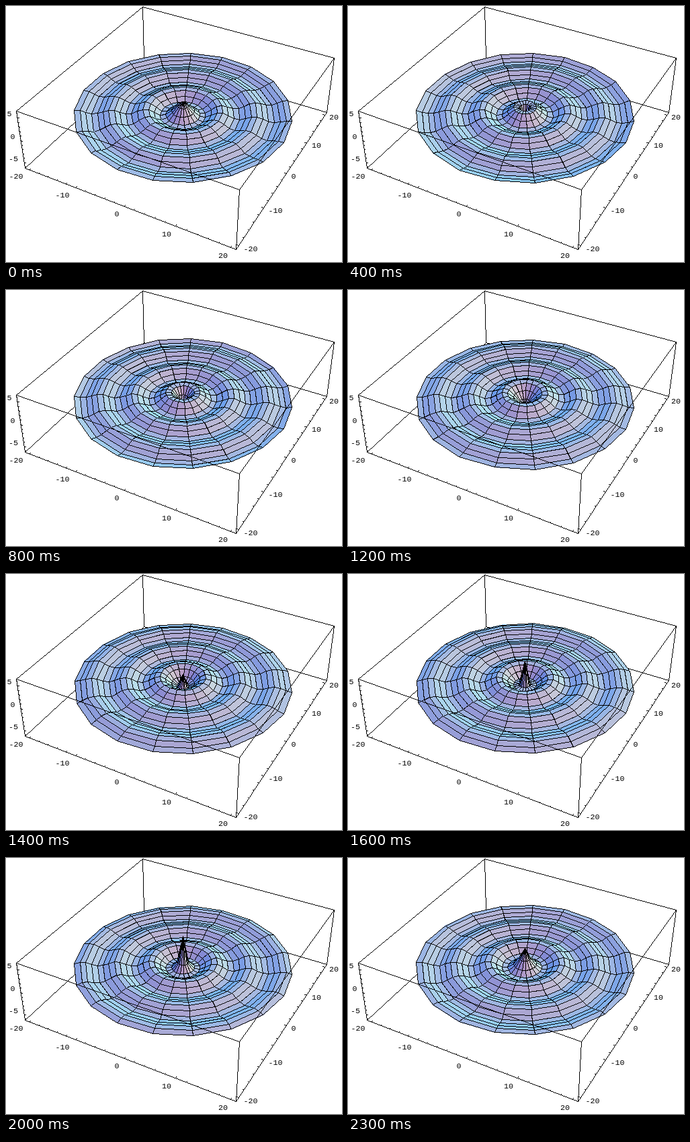
These frames come from a looping animation (500x381 px, 2.4 s). An HTML page with a canvas:

```html
<!DOCTYPE html>
<html lang="en">
<head>
<meta charset="utf-8">
<title>Outgoing cylindrical wave</title>
<style>
  html, body { margin: 0; width: 100%; height: 100%; overflow: hidden; background: #fff; }
  canvas, svg { position: absolute; left: 0; top: 0; display: block; }
  text { font: 11.67px "Liberation Mono", "Courier New", monospace; text-anchor: middle; }
</style>
</head>
<body>
<canvas id="plot" width="500" height="381"></canvas>
<svg id="labels" width="500" height="381"></svg>
<script>
const W = 500, H = 381;
const STEPS = 24, STEP_MS = 100;
const SPOKES = 19, RINGS = 19, R_MIN = 0.01, R_MAX = 20;
const XY = 21, Z = 6.36, AMP = 2;
const BLACK = 0xff000000;

const ctx = document.getElementById("plot").getContext("2d");
const image = ctx.createImageData(W, H);
const pixels = new Uint32Array(image.data.buffer);

// Camera: perspective view of the box centre, longest side scaled to 1.
const eye = [1.3, -2.4, 2];
const dist = Math.hypot(...eye);
const out = eye.map(v => v / dist);
const flat = Math.hypot(out[0], out[1]);
const right = [-out[1] / flat, out[0] / flat, 0];
const up = cross(out, right);

function cross(a, b) {
  return [a[1] * b[2] - a[2] * b[1], a[2] * b[0] - a[0] * b[2], a[0] * b[1] - a[1] * b[0]];
}
function dot(a, b) { return a[0] * b[0] + a[1] * b[1] + a[2] * b[2]; }
function sub(a, b) { return a.map((v, i) => v - b[i]); }

function project(p) {
  const q = p.map(v => v / (2 * XY));
  const depth = dist - dot(out, q);
  return {
    x: 262.8 + 1147 * dot(right, q) / depth,
    y: 157.2 - 1147 * dot(up, q) / depth,
    depth
  };
}

// Crisp one-pixel line.
function line(a, b) {
  let x = Math.round(a.x), y = Math.round(a.y);
  const x1 = Math.round(b.x), y1 = Math.round(b.y);
  const dx = Math.abs(x1 - x), dy = -Math.abs(y1 - y);
  const sx = x < x1 ? 1 : -1, sy = y < y1 ? 1 : -1;
  let err = dx + dy;
  for (;;) {
    if (x >= 0 && x < W && y >= 0 && y < H) pixels[y * W + x] = BLACK;
    if (x === x1 && y === y1) break;
    const e = 2 * err;
    if (e >= dy) { err += dy; x += sx; }
    if (e <= dx) { err += dx; y += sy; }
  }
}

// Paints every row the polygon touches: each pixel row is sampled at three heights.
function fillPoly(pts, color) {
  const ys = pts.map(p => p.y);
  const last = Math.round(Math.max(...ys));
  for (let row = Math.round(Math.min(...ys)); row <= last; row++) {
    for (const y of [row - 0.5, row, row + 0.5]) {
      const hits = [];
      pts.forEach((a, i) => {
        const b = pts[(i + 1) % pts.length];
        if ((a.y <= y) !== (b.y <= y)) hits.push(a.x + (y - a.y) * (b.x - a.x) / (b.y - a.y));
      });
      hits.sort((a, b) => a - b);
      for (let k = 0; k + 1 < hits.length; k += 2) {
        pixels.fill(color, row * W + Math.ceil(hits[k]), row * W + Math.floor(hits[k + 1]) + 1);
      }
    }
  }
}

// Ambient base plus a directional weight per view axis for red, green and blue.
const LIGHT = [[103, 80, 15, 74], [195, 72, 19, -45], [250, 3, 13, -56]];

function shade(normal) {
  const len = Math.hypot(...normal) || 1;
  let n = [right, up, out].map(axis => dot(axis, normal) / len);
  if (n[2] < 0 && n[1] < 0) n = n.map(v => -v);
  const rgb = LIGHT.map(([base, ...k]) =>
    Math.max(0, Math.min(255, Math.round(base + dot(k, n)))));
  return (BLACK | rgb[2] << 16 | rgb[1] << 8 | rgb[0]) >>> 0;
}

// Bessel functions J0 and Y0 by midpoint integration.
function bessel(x) {
  const n = 3000;
  let j = 0, y = 0;
  for (let i = 0; i < n; i++) {
    const t = (i + 0.5) / n * Math.PI / 2;
    const c = Math.cos(x * Math.cos(t));
    j += c;
    y += c * (0.5772157 + Math.log(2 * x * Math.sin(t) ** 2));
  }
  return { r: x, j: j / n, y: 2 * y / (Math.PI * n) };
}

const radii = Array.from({ length: RINGS + 1 }, (_, i) =>
  bessel(R_MIN + (R_MAX - R_MIN) * i / RINGS));

function drawSurface(phase) {
  const grid = radii.map(({ r, j, y }) => {
    const z = AMP * (j * Math.cos(phase) + y * Math.sin(phase));
    return Array.from({ length: SPOKES + 1 }, (_, s) => {
      const a = 2 * Math.PI * s / SPOKES;
      const p = [r * Math.cos(a), r * Math.sin(a), z];
      return { p, ...project(p) };
    });
  });
  const faces = [];
  for (let i = 0; i < RINGS; i++) {
    for (let s = 0; s < SPOKES; s++) {
      const q = [grid[i][s], grid[i + 1][s], grid[i + 1][s + 1], grid[i][s + 1]];
      const normal = cross(sub(q[2].p, q[0].p), sub(q[3].p, q[1].p));
      faces.push({ q, color: shade(normal), depth: q.reduce((d, v) => d + v.depth, 0) });
    }
  }
  faces.sort((a, b) => b.depth - a.depth);
  for (const { q, color } of faces) {
    fillPoly(q, color);
    q.forEach((v, i) => line(v, q[(i + 1) % 4]));
  }
}

function edge(a, b) { line(project(a), project(b)); }

const corners = [[-XY, -XY], [XY, -XY], [XY, XY], [-XY, XY]];
const low = corners.map(c => [...c, -Z]);
const high = corners.map(c => [...c, Z]);

function drawBack() {
  edge(low[0], low[3]);
  edge(low[3], low[2]);
  edge(low[3], high[3]);
}

function drawFront() {
  edge(low[0], low[1]);
  edge(low[1], low[2]);
  for (let i = 0; i < 4; i++) {
    edge(high[i], high[(i + 1) % 4]);
    if (i < 3) edge(low[i], high[i]);
  }
  for (let v = -20; v <= 20; v += 2) {
    const len = v % 10 ? 0.2 : 0.36;
    edge([v, -XY, -Z], [v, -XY + len, -Z]);
    edge([XY, v, -Z], [XY - len, v, -Z]);
  }
  for (let v = -6; v <= 6; v++) {
    edge([-XY, -XY, v], [-XY + (v % 5 ? 0.2 : 0.36), -XY, v]);
  }
}

function addLabels(first, step, spots) {
  spots.forEach(([x, y], i) => {
    const t = document.createElementNS("http://www.w3.org/2000/svg", "text");
    t.setAttribute("x", x);
    t.setAttribute("y", y + 4);
    t.textContent = first + step * i;
    document.getElementById("labels").append(t);
  });
}
addLabels(-20, 10, [[15, 253], [84, 281], [165, 309], [239, 339], [323, 371]]);
addLabels(-20, 10, [[364, 361], [401, 304], [428, 253], [462, 207], [488, 165]]);
addLabels(-5, 5, [[11, 227], [10, 194], [5, 160]]);

let shown = -1;
function tick() {
  const step = Math.floor(performance.now() / STEP_MS) % STEPS;
  if (step !== shown) {
    shown = step;
    pixels.fill(0xffffffff);
    drawBack();
    drawSurface(2 * Math.PI * step / STEPS);
    drawFront();
    ctx.putImageData(image, 0, 0);
  }
  requestAnimationFrame(tick);
}
tick();
</script>
</body>
</html>
```
